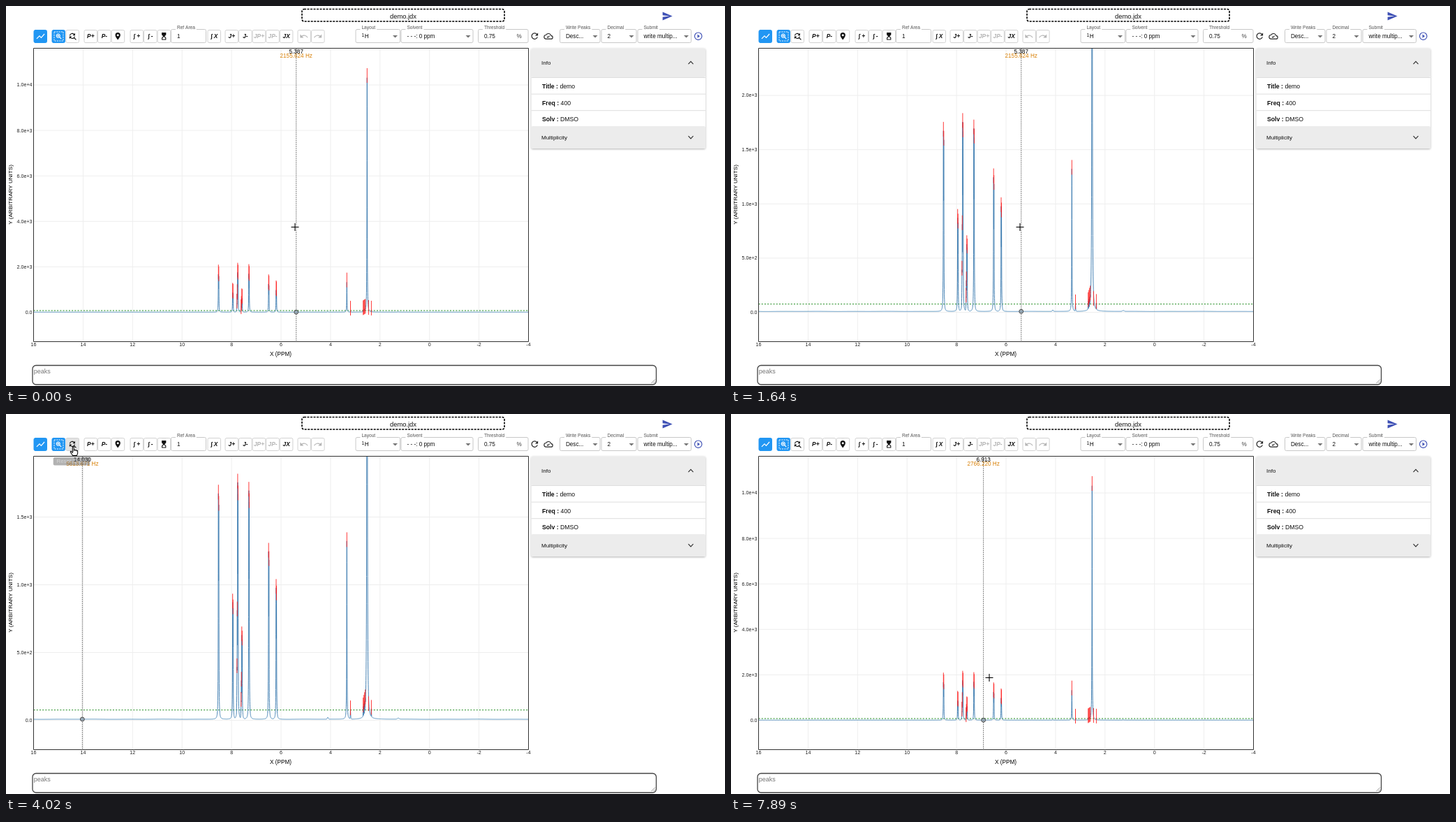
These frames come from a looping animation (1030x544 px, 8 s). An HTML page with a canvas:

```html
<!DOCTYPE html>
<html lang="en">
<head>
<meta charset="utf-8">
<title>Spectrum viewer</title>
<style>
html, body { margin: 0; width: 100%; height: 100%; overflow: hidden; background: #fff; }
canvas { display: block; width: 1030px; height: 544px; }
</style>
</head>
<body>
<canvas id="stage"></canvas>
<script>
const W = 1030, H = 544, LOOP = 8000;
const FONT = '"Liberation Sans", Arial, sans-serif';
const BLUE = '#2196f3', INDIGO = '#3f51b5', INK = '#111', OFF = '#b5b5b5';
const canvas = document.getElementById('stage');
const ratio = window.devicePixelRatio || 1;
canvas.width = W * ratio;
canvas.height = H * ratio;
const ctx = canvas.getContext('2d');

// ---- drawing helpers ----
function text(str, x, y, size, color = INK, align = 'left', style = '') {
  ctx.font = `${style} ${size}px ${FONT}`;
  ctx.fillStyle = color;
  ctx.textAlign = align;
  ctx.fillText(str, x, y);
}

function box(x, y, w, h, r, fill, stroke, width = 1, dash = []) {
  ctx.beginPath();
  ctx.roundRect(x, y, w, h, r);
  if (fill) { ctx.fillStyle = fill; ctx.fill(); }
  if (stroke) strokeWith(stroke, width, dash);
}

function strokeWith(color, width = 1, dash = []) {
  ctx.setLineDash(dash);
  ctx.strokeStyle = color;
  ctx.lineWidth = width;
  ctx.stroke();
  ctx.setLineDash([]);
}

function line(x1, y1, x2, y2, color, width, dash) {
  ctx.beginPath();
  ctx.moveTo(x1, y1);
  ctx.lineTo(x2, y2);
  strokeWith(color, width, dash);
}

function poly(...points) {
  ctx.beginPath();
  for (const [x, y] of points) ctx.lineTo(x, y);
}

// Icons live on a 24-unit grid: an optional fill path and an optional stroke path.
const ICONS = {
  chart: { stroke: 'M2.7 17.7L9.5 11l4 4L21.3 6.2' },
  zoom: { stroke: 'M14 14l4.5 4.5M6 10.5a4.5 4.5 0 1 0 9 0a4.5 4.5 0 1 0-9 0M8 10.5h5M10.5 8v5' },
  reset: { fill: 'M12 10h6V4zM10 12H4v6z', stroke: 'M5 10a6 6 0 0 1 10.5-3M17 12a6 6 0 0 1-10.5 3M15.5 15.5l5 5' },
  pin: { fill: 'M12 2a7 7 0 0 0-7 7c0 5 7 13 7 13s7-8 7-13a7 7 0 0 0-7-7zm0 4a3 3 0 1 1 0 6a3 3 0 0 1 0-6z' },
  glass: { fill: 'M6 2h12v6l-4 4 4 4v6H6v-6l4-4-4-4zM8 17v3h8v-3l-4-3.5z' },
  undo: { fill: 'M2 7v9h9z', stroke: 'M6 12A10 10 0 0 1 21 15.5' },
  refresh: { fill: 'M13 11h7V4z', stroke: 'M17.4 7.4A7 7 0 1 0 18.7 14' },
  cloud: { stroke: 'M6 19h13a4 4 0 0 0 0-8A7 7 0 0 0 6 9a5 5 0 0 0 0 10zM8.5 13l2 2.300 4.500-4.500' },
  play: { fill: 'M10 16.5l6-4.5-6-4.5z', stroke: 'M3 12a9 9 0 1 0 18 0a9 9 0 1 0-18 0' },
  send: { fill: 'M2 21L23 12 2 3v7l15 2-15 2z' },
  hand: { fill: 'M8 22L3 14.5c-1-2 1-3 2-1.500L7.5 15V3.500c0-2 3-2 3 0V10c.5-1.500 2.500-1 3 0c.5-1 2.500-1 3 1c.5-1 2.500-.5 2.500 1V17l-2 5z' }
};
for (const parts of Object.values(ICONS))
  for (const part in parts) parts[part] = new Path2D(parts[part]);

function icon(name, cx, cy, scale, color, flip = 1) {
  const { fill, stroke } = ICONS[name];
  ctx.save();
  ctx.translate(cx, cy);
  ctx.scale(scale * flip, scale);
  ctx.translate(-12, -12);
  ctx.fillStyle = ctx.strokeStyle = color;
  ctx.lineWidth = 2;
  if (fill) ctx.fill(fill, 'evenodd');
  if (stroke) ctx.stroke(stroke);
  ctx.restore();
}

// ---- timeline ----
// The screen refreshes only during bursts: start, end, number of steps.
const BURSTS = {
  zoomA: [600, 900, 3], zoomB: [1350, 1790, 4], leave: [2540, 3570, 8], hover: [3720, 4170, 4],
  reset: [4770, 5220, 4], back: [5800, 6540, 6], enter: [6990, 7890, 7]
};

function stepTimes([from, to, steps]) {
  return Array.from({ length: steps }, (_, i) =>
    Math.floor((from + (to - from) * i / (steps - 1)) / 10) * 10);
}
const STEPS = Object.values(BURSTS).flatMap(stepTimes);

const held = t => STEPS.reduce((last, at) => at <= t ? at : last, 0);
const done = (burst, t) => stepTimes(burst).filter(at => at <= t).length / burst[2];
const ramp = (t, from, to) => Math.min(1, Math.max(0, (t - from) / (to - from)));
const pulse = (t, a, b, c, d) => Math.min(ramp(t, a, b), 1 - ramp(t, c, d));

// Keys are [time, ...values], joined by straight segments.
function along(keys, t) {
  const next = keys.findIndex(k => k[0] > t);
  if (next < 0) return keys[keys.length - 1].slice(1);
  const a = keys[next - 1], b = keys[next];
  const k = ramp(t, a[0], b[0]);
  return a.map((v, i) => v + (b[i] - v) * k).slice(1);
}

const POINTER = [[0, 414, 316], [2390, 414, 316], [2540, 397, 310], [3270, 225, 200], [3720, 118, 84],
  [4020, 96, 53], [5800, 96, 53], [6540, 77, 48], [6890, 77, 48], [7140, 108, 82], [7890, 370, 377]];
const TRACKER_HZ = [[0, 2155.624], [2390, 2155.624], [2540, 2162.96], [3270, 4392.357],
  [3720, 5613.671], [7040, 5613.671], [7890, 2766.22]];

function zoomLevel(t) {
  if (done(BURSTS.reset, t) >= 0.5) return 0;
  return Math.round(4 * done(BURSTS.zoomA, t) + 4 * done(BURSTS.zoomB, t));
}

// ---- spectrum ----
const LEFT = 39.5, RIGHT = 748.5, TOP = 60.5, BOTTOM = 480.5, ZERO = 438.5;
const FREQ = 400.13, UNIT = 0.03255, WHEEL = 1.25, BASE = 8;
const toX = ppm => LEFT + (16 - ppm) * (RIGHT - LEFT) / 20;

// Signals: x, height, number of lines. Extra lines follow one pattern of offset and ratio.
const SIGNALS = [[304.3, 1666, 2], [324.7, 862, 2], [331.9, 1747, 4], [337.8, 620, 4], [347.9, 1687, 2],
  [376.2, 1237, 2], [387, 970, 2], [488.3, 1315, 1], [493.5, 74, 1], [517.3, 10307, 1],
  [519.4, 105, 1], [523.4, 78, 1]];
const SPLIT = [[0, 1], [0.5, 0.95], [-0.6, 0.46], [-1, 0.22]];
const PEAKS = SIGNALS.flatMap(([x, h, n]) => SPLIT.slice(0, n).map(([dx, k]) => [x + dx, h * k]));
for (let i = 0; i < 4; i++) PEAKS.push([511.7 + i, 95 + 20 * i]);

const curve = [];
for (let x = LEFT; x <= RIGHT; x += 0.1) {
  const bell = ([px, h]) => h / (1 + ((x - px) / 0.27) ** 2);
  const bump = 14 * Math.exp(-((x - 461) ** 2)) + 8 * Math.exp(-((x - 562) ** 2) / 3);
  curve.push([x, BASE + bump + Math.max(...PEAKS.map(bell)) + 0.8 * Math.sin(x / 11) * Math.sin(x / 29)]);
}

function tickStep(span) {
  const raw = span / 5, power = 10 ** Math.floor(Math.log10(raw));
  const factor = [10, 5, 2, 1].find(f => f === 1 || raw / power >= Math.sqrt(f === 2 ? 2 : f * f / (f === 5 ? 2.5 : 2)));
  return power * factor;
}

function drawAxes(scale, toY) {
  const step = tickStep((BOTTOM - TOP) / scale);
  for (let v = 0; toY(v) > TOP; v += step) {
    line(LEFT, toY(v), RIGHT, toY(v), '#eee');
    text(v ? v.toExponential(1) : '0.0', 37.5, toY(v) + 2.4, 7.1, '#222', 'right');
  }
  for (let p = 16; p >= -4; p -= 2) {
    line(toX(p), TOP, toX(p), BOTTOM, '#eee');
    text(String(p), toX(p), 487, 7.1, '#222', 'center');
  }
  text('X (PPM)', 393.5, 501, 8.2, '#000', 'center');
  ctx.save();
  ctx.translate(9, 270);
  ctx.rotate(-Math.PI / 2);
  text('Y (ARBITRARY UNITS)', 0, 0, 8.1, '#000', 'center');
  ctx.restore();
}

function drawTracker(hz, y) {
  const ppm = hz / FREQ, x = toX(ppm);
  line(x, TOP, x, BOTTOM, '#555', 1, [1.4, 1.4]);
  ctx.beginPath();
  ctx.arc(x, y, 2.9, 0, Math.PI * 2);
  ctx.fillStyle = 'rgba(130,150,165,.55)';
  ctx.fill();
  strokeWith('#444');
  text(ppm.toFixed(3), x, 68, 8.2, '#000', 'center');
  text(hz.toFixed(3) + ' Hz', x, 74.2, 8.2, '#d9820a', 'center');
}

function drawChart(scale, hz) {
  const toY = v => ZERO - v * scale;
  drawAxes(scale, toY);
  ctx.save();
  ctx.beginPath();
  ctx.rect(LEFT, TOP, RIGHT - LEFT, BOTTOM - TOP);
  ctx.clip();
  line(LEFT, toY(76), RIGHT, toY(76), '#1c8a1c', 1, [2.1, 2.1]);
  ctx.lineJoin = 'bevel';
  poly(...curve.map(([x, v]) => [x, toY(v)]));
  strokeWith('#4682b4');
  for (const [x, v] of PEAKS) line(x, toY(v) - 14, x, toY(v) + 7, '#f22', 0.9);
  ctx.restore();
  ctx.lineJoin = 'miter';
  box(LEFT, TOP, RIGHT - LEFT, BOTTOM - TOP, 0, null, '#333');
  drawTracker(hz, toY(BASE));
}

// ---- page chrome ----
// Toolbar groups: first centre, then labels or icon names.
const PITCH = 19.6;
const GROUPS = [[121, 'P+', 'P-', 'pin'], [187, '∫ +', '∫ -', 'glass'], [298, '∫ X'],
  [323, 'J+', 'J-', 'JP+', 'JP-', 'JX'], [427, 'undo', 'redo']];
const FIELDS = [[236.5, 286.5, 'Ref Area', '1'], [501, 564.5, 'Layout', '', true],
  [566, 669, 'Solvent', '- - -: 0 ppm', true], [676.5, 748, 'Threshold', '0.75'],
  [793.5, 851, 'Write Peaks', 'Desc...', true], [853, 903, 'Decimal', '2', true],
  [905, 981.5, 'Submit', 'write multip...', true]];

function button(cx, fill = '#fff', border = '#d2d2d2') {
  box(cx - 9, 34.5, 18.5, 18, 2, fill, border);
}

function drawTool(name, x) {
  button(x);
  if (name === 'undo' || name === 'redo') icon('undo', x, 43.3, 0.56, OFF, name === 'undo' ? 1 : -1);
  else if (ICONS[name]) icon(name, x, 43.3, 0.52, INK);
  else text(name, x + 0.3, 46, 8.4, name.startsWith('JP') ? OFF : INK, 'center', 'italic bold');
}

function drawField([left, right, label, value, arrow]) {
  const x = left + 8.4;
  box(left, 33.5, right - left, 19, 2, null, '#c8c8c8');
  ctx.font = `6.6px ${FONT}`;
  ctx.fillStyle = '#fff';
  ctx.fillRect(x - 2, 31, ctx.measureText(label).width + 4, 4);
  text(label, x, 33.3, 6.6, '#555');
  text(value, x, 45.8, 8.2);
  if (!arrow) return;
  poly([right - 10.5, 42], [right - 3.5, 42], [right - 7, 45.5]);
  ctx.fillStyle = '#757575';
  ctx.fill();
}

function drawToolbar(t) {
  const onReset = pulse(t, 3720, 4020, 5950, 6240), press = pulse(t, 4620, 5070, 5070, 5500);
  const onZoom = pulse(t, 6100, 6540, 6840, 7140);
  const gray = 255 - 28 * onReset - 43 * press;
  const zoomBg = `rgb(${33 + 20 * onZoom},${150 + 28 * onZoom},243)`;
  button(49, BLUE, BLUE);
  icon('chart', 49.5, 43.5, 0.6, '#fff');
  button(75, zoomBg, zoomBg);
  box(69, 37, 13, 13, 0, null, '#fff', 0.9, [2, 1.3]);
  icon('zoom', 75.6, 43.4, 0.56, '#fff');
  button(95, `rgb(${gray},${gray},${gray})`);
  icon('reset', 95.5, 43.5, 0.58, INK);
  for (const [x, ...tools] of GROUPS) tools.forEach((name, i) => drawTool(name, x + i * PITCH));
  FIELDS.forEach(drawField);
  text('1', 509.5, 43.5, 6.6);
  text('H', 513.8, 45.8, 8.2);
  text('%', 731.5, 45.8, 8.2, '#444');
  icon('refresh', 757.3, 43.2, 0.6, '#222');
  icon('cloud', 777, 43.2, 0.56, '#222');
  icon('play', 991.7, 43.2, 0.58, INDIGO);
}

function drawHeader(label, y, h, dir) {
  const mid = y + h / 2;
  box(752.5, y, 249.5, h, 2, '#ececec');
  text(label, 767, mid + 2.9, 8);
  poly([977.5, mid - 1.8 * dir], [981, mid + 1.8 * dir], [984.5, mid - 1.8 * dir]);
  strokeWith('#333', 1.2);
}

function drawPanel() {
  ctx.save();
  ctx.shadowColor = 'rgba(0,0,0,.3)';
  ctx.shadowBlur = 3;
  ctx.shadowOffsetY = 1;
  box(752.5, 60.5, 249.5, 143.5, 2, '#fff');
  ctx.restore();
  drawHeader('Info', 60.5, 41.5, -1);
  drawHeader('Multiplicity', 172, 32, 1);
  ['Title : demo', 'Freq : 400', 'Solv : DMSO'].forEach((row, i) => {
    const y = 118 + i * 23.6, cut = row.indexOf(':') + 2;
    line(752.5, y - 15.5, 1002, y - 15.5, '#dedede');
    text(row.slice(0, cut), 768, y, 8.7, INK, 'left', 'bold');
    text(row.slice(cut), 768 + ctx.measureText(row.slice(0, cut)).width, y, 8.7);
  });
}

function drawPage() {
  box(424, 4.5, 290, 17.5, 3, null, '#000', 1.6, [3, 1.5]);
  text('demo.jdx', 569, 18, 9.4, INK, 'center');
  icon('send', 947.3, 14.5, 0.667, INDIGO);
  box(38, 514.5, 893.5, 27.5, 5, '#fff', '#444', 1.3);
  text('peaks', 39.8, 526, 9, '#757575');
  for (const d of [2.5, 5.5]) line(930 - d, 540, 930, 540 - d, '#777', 0.8);
}

function drawTip(label, cx, alpha) {
  ctx.globalAlpha = 0.9 * alpha;
  ctx.font = `7.9px ${FONT}`;
  const width = ctx.measureText(label).width + 9.5;
  box(cx - width / 2, 62, width, 11.5, 2, '#555');
  text(label, cx, 70.4, 7.9, '#fff', 'center');
  ctx.globalAlpha = 1;
}

function drawHand(x, y) {
  const path = ICONS.hand.fill;
  ctx.save();
  ctx.translate(x - 5.5, y - 7.5);
  ctx.scale(0.64, 0.64);
  ctx.fillStyle = '#fff';
  ctx.strokeStyle = '#000';
  ctx.lineWidth = 1.6;
  ctx.fill(path);
  ctx.stroke(path);
  ctx.restore();
}

function drawCross(x, y) {
  for (const [color, width, arm] of [['#fff', 2.6, 6], ['#000', 1.1, 5.5]]) {
    line(x - arm, y, x + arm, y, color, width);
    line(x, y - arm, x, y + arm, color, width);
  }
}

function draw(now) {
  const t = held(now % LOOP);
  ctx.setTransform(ratio, 0, 0, ratio, 0, 0);
  ctx.fillStyle = '#fff';
  ctx.fillRect(0, 0, W, H);
  drawPage();
  drawChart(UNIT * WHEEL ** zoomLevel(t), along(TRACKER_HZ, t)[0]);
  drawPanel();
  drawToolbar(t);
  drawTip('Reset Zoom', 94, pulse(t, 3870, 4170, 5950, 6240));
  drawTip('Zoom In', 74.7, pulse(t, 6240, 6540, 6840, 7140));
  const [x, y] = along(POINTER, t);
  if (y < 60) drawHand(x, y);
  else drawCross(x, y + 0.5);
}

const start = performance.now();
function tick() {
  draw(performance.now() - start);
  requestAnimationFrame(tick);
}
tick();
</script>
</body>
</html>
```
